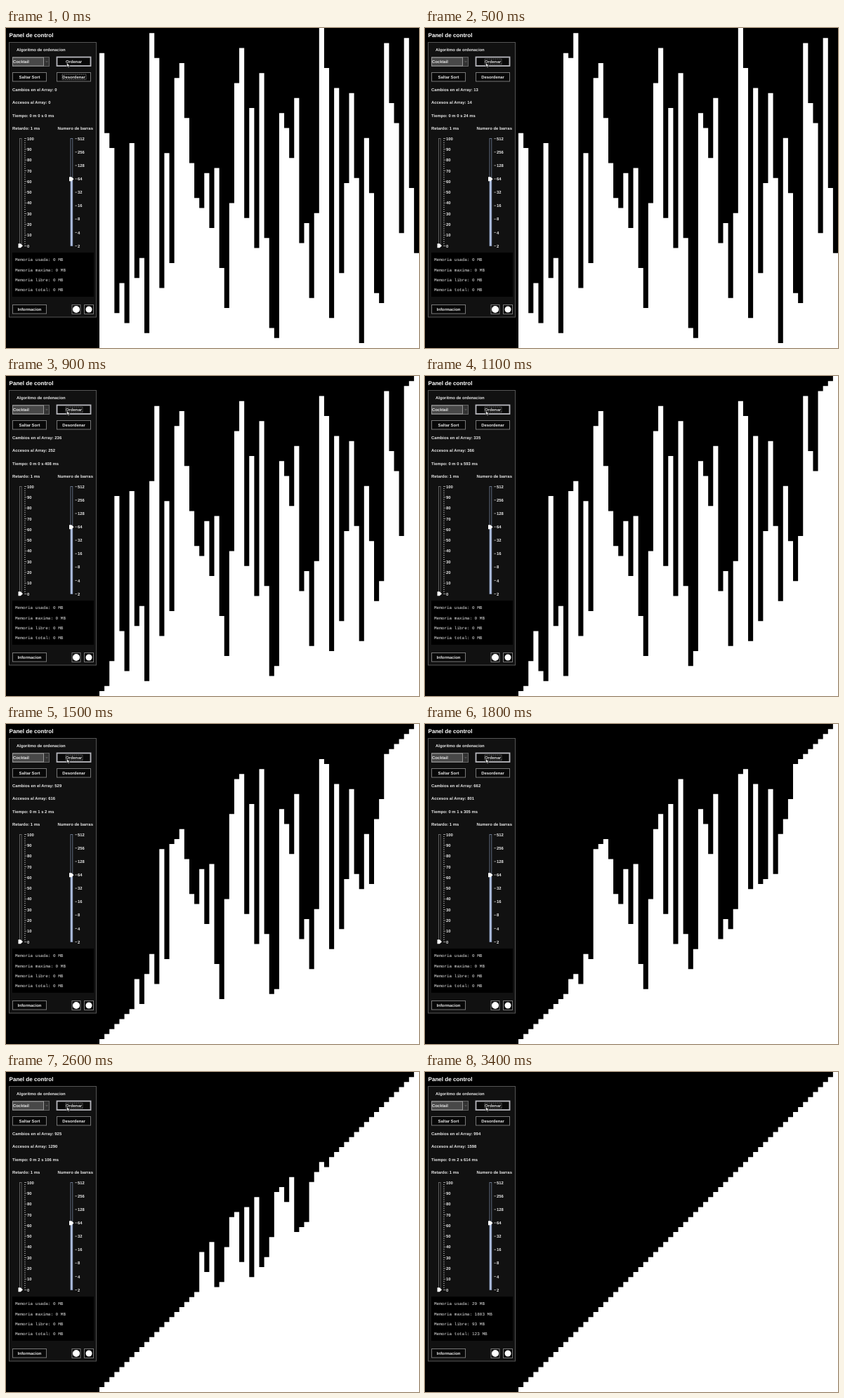
Animation, 588 px wide and 456 px high, one loop 3.6 s. Source, as an HTML page:

```html
<!DOCTYPE html>
<html lang="es">
<head>
<meta charset="utf-8">
<title>Cocktail sort</title>
<style>
html, body { margin: 0; width: 100%; height: 100%; overflow: hidden; background: #000; }
svg { display: block; }
text { font: bold 5.9px "Liberation Sans", Arial, sans-serif; fill: #e6e6e6; text-rendering: geometricPrecision; white-space: pre; }
.title { font-size: 8.1px; fill: #fff; }
.mid { text-anchor: middle; }
.mono { font: 6px "Liberation Mono", "Courier New", monospace; }
.btn { fill: #080808; stroke: #777; }
.hot { stroke: #b8b8be; stroke-width: 1.8; }
.focus { fill: none; stroke: #999; stroke-width: .7; stroke-dasharray: 1 .5; }
.tick { stroke: #bbb; stroke-width: .8; }
</style>
</head>
<body>
<svg width="588" height="456" viewBox="0 0 588 456">
  <rect width="588" height="456"/>
  <path id="bars" fill="#fff"/>
  <text class="title" x="4.5" y="13">Panel de control</text>
  <rect x="4.5" y="20.5" width="124" height="391.5" fill="#111" stroke="#555"/>
  <text x="15" y="33">Algoritmo de ordenacion</text>
  <rect x="9.5" y="41.5" width="52" height="13" fill="#333" stroke="#666"/>
  <rect x="9.5" y="42" width="44" height="12" fill="#484848" stroke="#999"/>
  <path d="M56 47h4l-2 2.5z" fill="#555"/>
  <text x="10" y="50">Cocktail</text>
  <g id="buttons"></g>
  <rect id="focus" class="focus" height="7.5"/>
  <path d="M86.5 49.5v6.4l1.5-1.3 1 2.1 1.1-.5-1-2.1h2z" fill="#ddd" stroke="#000" stroke-width=".5"/>
  <text id="swaps" x="9" y="90"/>
  <text id="reads" x="9" y="108"/>
  <text id="clock" x="9" y="126.5"/>
  <text x="9" y="144.7">Retardo: 1 ms</text>
  <text x="73.5" y="144.7">Numero de barras</text>
  <rect x="19.5" y="157.5" width="2.6" height="153" fill="#080808" stroke="#777" stroke-width=".8"/>
  <rect x="92" y="157.5" width="2.8" height="58" fill="#080808" stroke="#7887a0" stroke-width=".8"/>
  <rect x="92" y="215" width="2.8" height="95.5" fill="#b4c4e2" stroke="#8598bc" stroke-width=".8"/>
  <path d="M17.5 307.3h3.3l3.2 3-3.2 3h-3.3zM90 212.3h3.3l3.2 3-3.2 3H90z" fill="#fff"/>
  <g id="scales"></g>
  <rect x="9" y="320" width="116" height="63"/>
  <g id="memory"></g>
  <rect class="btn" x="94" y="394.5" width="12" height="13"/>
  <rect class="btn" x="111.5" y="394.5" width="13" height="13"/>
  <circle cx="100" cy="401" r="5" fill="#fff"/>
  <circle cx="118" cy="401" r="4.5" fill="#fff"/>
</svg>
<script>
const $ = id => document.getElementById(id);

const button = (x, y, label, hot = "") =>
  `<rect class="btn ${hot}" x="${x + .5}" y="${y + .5}" width="48" height="12.5"/>
   <text class="mid" x="${x + 24.5}" y="${y + 9}">${label}</text>`;
$("buttons").innerHTML = button(72, 41, "Ordenar", "hot") + button(9, 63, "Saltar Sort") +
  button(72, 63, "Desordenar") + button(9, 394, "Informacion");

const tick = (x, y, w) => `<path class="tick" d="M${x} ${y}h${w}"/>`;
const label = (x, y, s) => `<text x="${x}" y="${y + 2.1}">${s}</text>`;
let scales = "";
for (let i = 0; i <= 50; i++) {
  const y = 157.5 + i * 3.06, major = i % 5 === 0;
  scales += tick(26, y, major ? 3.2 : 1.8);
  if (major) scales += label(30, y, 100 - 2 * i);
}
for (let i = 0; i <= 8; i++) {
  const y = 157.7 + i * 19.1;
  scales += tick(98.3, y, 2.8) + label(102, y, 512 >> i);
}
$("scales").innerHTML = scales;

// The shuffled bars that the sort starts from
const start = [
  59, 43, 40, 7, 13, 5, 41, 14, 18, 3, 63, 58, 12, 39, 17, 54,
  57, 46, 37, 30, 28, 35, 24, 36, 16, 8, 29, 53, 60, 26, 48, 20,
  55, 22, 4, 2, 47, 44, 38, 50, 21, 25, 10, 27, 64, 56, 6, 52,
  15, 33, 51, 34, 1, 42, 31, 11, 9, 61, 49, 45, 23, 62, 32, 19];
const total = 1598, lag = 3; // the bars are painted a few steps behind the counters

// Cocktail sort, stopped after a number of comparisons
function sortTo(steps) {
  const a = start.slice();
  let swaps = 0;
  const compare = i => {
    if (steps-- > 0 && a[i] > a[i + 1]) {
      [a[i], a[i + 1]] = [a[i + 1], a[i]];
      swaps++;
    }
  };
  for (let s = 0, e = 63; s < e && steps > 0; s++, e--) {
    for (let i = s; i < e; i++) compare(i);
    for (let i = e - 1; i >= s; i--) compare(i);
  }
  return { a, swaps };
}

// Key points: loop time, sort clock, comparisons
const pace = [
  [476, 0, 0], [700, 224, 138], [1100, 593, 366], [1500, 1002, 616],
  [2200, 1709, 1049], [2600, 2106, 1290], [3108, 2614, total]];

function paceAt(t) {
  const k = pace.findLastIndex(p => p[0] <= t);
  if (k < 0) return pace[0];
  const p = pace[k], q = pace[k + 1] || p;
  const f = (t - p[0]) / (q[0] - p[0] || 1);
  return p.map((v, i) => Math.floor(v + Math.min(f, 1) * (q[i] - v)));
}

function draw(t) {
  const [, ms, reads] = paceAt(t);
  const bars = sortTo(reads < total ? reads - lag : total).a;
  const steps = bars.map((v, i) => `V${456 - v * 7.125}H${133 + (i + 1) * 455 / 64}`);
  $("bars").setAttribute("d", `M133 456${steps.join("")}V456z`);

  $("swaps").textContent = `Cambios en el Array: ${sortTo(reads).swaps}`;
  $("reads").textContent = `Accesos al Array: ${reads}`;
  $("clock").textContent = `Tiempo: 0 m ${Math.floor(ms / 1000)} s ${ms % 1000} ms`;

  const [x, y, width] = t < 500 ? [80, 66, 34] : [85, 44.2, 24];
  for (const [name, v] of Object.entries({ x, y, width })) $("focus").setAttribute(name, v);

  const done = t >= 3200;
  const memory = { usada: 29, maxima: 1803, libre: 93, total: 123 };
  $("memory").innerHTML = Object.entries(memory).map(([name, mb], i) =>
    `<text class="mono" x="13" y="${332.3 + i * 14.3}">Memoria ${name}: ${done ? mb : 0} MB</text>`).join("");
}

const begin = performance.now();
let shown = -1;
function loop() {
  const t = Math.floor((performance.now() - begin) % 3600 / 100) * 100;
  if (t !== shown) draw(shown = t);
  requestAnimationFrame(loop);
}
loop();
</script>
</body>
</html>
```
